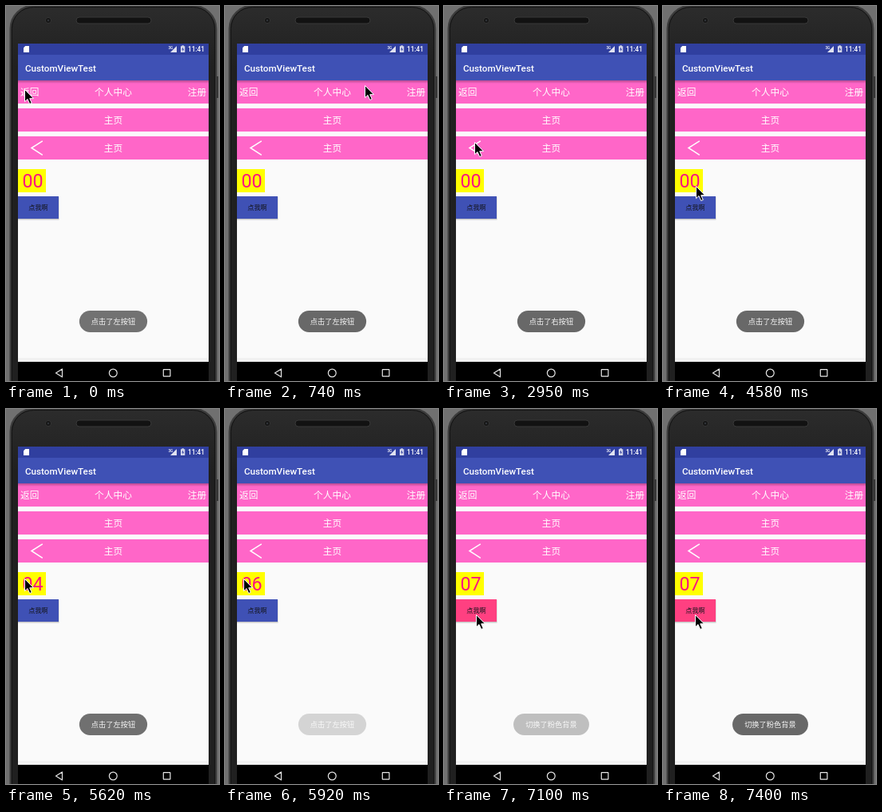
Animation of 267 by 469 pixels, one loop 8 s. Source, as an HTML page:

```html
<!DOCTYPE html>
<html lang="zh">
<head>
<meta charset="utf-8">
<title>CustomViewTest</title>
<style>
  html, body { margin: 0; width: 100%; height: 100%; overflow: hidden; background: #707070; }
  svg { display: block; width: 267px; height: 469px; }
  text { font-family: Roboto, "Noto Sans CJK SC", "Noto Sans CJK", sans-serif; }
  .bar { font-size: 11.7px; fill: #fff; }
  .mid { text-anchor: middle; }
  .medium { font-weight: 500; }
</style>
</head>
<body>
<svg viewBox="0 0 267 469">
  <defs>
    <linearGradient id="shade" x2="0" y2="1">
      <stop offset="0" stop-opacity=".28"/>
      <stop offset="1" stop-opacity="0"/>
    </linearGradient>
    <linearGradient id="body" x2="0" y2="1">
      <stop offset="0" stop-color="#2c2c2c"/>
      <stop offset=".15" stop-color="#202020"/>
    </linearGradient>
  </defs>

  <!-- phone -->
  <rect width="267" height="469" fill="#707070"/>
  <rect x="263" y="88" width="3" height="27" fill="#303030"/>
  <rect x="5.5" y="-.5" width="258" height="520" rx="29" fill="url(#body)" stroke="#3d3d3d" stroke-width="2"/>
  <rect x="7.5" y="1.5" width="254" height="520" rx="27" fill="none" stroke="#141414"/>
  <rect x="88" y="14" width="94" height="8" rx="4" fill="#121212" stroke="#393939"/>
  <circle cx="53" cy="18" r="3.6" fill="#151515" stroke="#353535"/>
  <circle cx="53" cy="18" r="1.3" fill="#2f3338"/>

  <!-- screen -->
  <rect x="15" y="47" width="239" height="422" fill="#fafafa"/>
  <rect x="15" y="47" width="239" height="14" fill="#303f9f"/>
  <rect x="15" y="61" width="239" height="32" fill="#3f51b5"/>
  <rect x="15" y="440" width="239" height="5" fill="#f2f2f2"/>
  <rect x="15" y="445" width="239" height="24"/>

  <g fill="#fff">
    <path d="M24.2 50H29V58H22V52.2Z"/>
    <path d="M214 50V58H206Z" opacity=".85"/>
    <text x="203.5" y="53.5" font-size="4.6" class="medium">3G</text>
    <path d="M220.5 50.2V49.2H222.8V50.2H224.3V58H219V50.2Z" opacity=".8"/>
    <text x="228" y="57" font-size="8.2" class="medium">11:41</text>
    <text x="24" y="81.5" font-size="11.66" class="medium">CustomViewTest</text>
  </g>
  <path d="M221.9 51.4L220.2 54.4H221.5V56.8L223.2 53.7H221.9Z" fill="#303f9f"/>

  <!-- title bars -->
  <path d="M15 93H254V122H15ZM15 128H254V157H15ZM15 163H254V192H15Z" fill="#ff66c8"/>
  <rect x="15" y="93" width="239" height="4" fill="url(#shade)"/>
  <g class="bar">
    <text x="18" y="112.3">返回</text>
    <text x="134.5" y="112.3" class="mid">个人中心</text>
    <text x="251.2" y="112.3" text-anchor="end">注册</text>
    <text x="134.5" y="147.2" class="mid">主页</text>
    <text x="134.5" y="182" class="mid">主页</text>
  </g>
  <path d="M45.8 168.8L32 177.5L45.8 186.3" fill="none" stroke="#fff" stroke-width="1.5"/>

  <!-- counter and button -->
  <rect x="15" y="204" width="35" height="29" fill="#ff0"/>
  <text id="count" x="33.6" y="226.8" class="mid" font-size="23.3" fill="#fb1280"></text>
  <rect x="15" y="239" width="51.5" height="28.5" fill="#000" opacity=".2"/>
  <rect id="button" x="15" y="238" width="51" height="28"/>
  <text x="40.5" y="255.2" class="mid medium" font-size="8.2" fill="#15161c">点我啊</text>

  <!-- navigation -->
  <g fill="none" stroke="#e6e6e6" stroke-width="1.2">
    <path d="M70.5 454V464L62.5 459Z" stroke-linejoin="round"/>
    <circle cx="134.3" cy="459" r="4.9"/>
    <rect x="197.3" y="454.6" width="8.6" height="8.6" rx=".5"/>
  </g>

  <g id="toast">
    <rect id="pill" y="381" height="27" rx="13.5" fill="#686868"/>
    <text id="note" x="134.5" y="398" class="mid" font-size="9.25" fill="#f4f4f4"></text>
  </g>

  <path id="cursor" d="M0 0V15.2L3.5 12L6.2 18L8.8 16.9L6.2 11.2H11Z" stroke="#fff" stroke-width="1" stroke-linejoin="round"/>
</svg>
<script>
const LOOP = 8000, STEP = 148, LEAD = 10;

// Each row: step, then value(s)
const path = [
  [0, 23, 104], [1, 26, 103], [2, 45, 101], [3, 85, 99], [4, 130, 98], [5, 175, 99],
  [6, 212, 102], [7, 230, 107], [8, 234, 109], [12, 234, 109],
  [13, 228, 111], [14, 190, 122], [16, 75, 156], [17, 40, 168], [18, 29, 171],
  [19, 37, 171], [20, 38, 170], [24, 38, 170],
  [27, 36, 190], [29, 40, 212], [30, 41, 225], [31, 41, 225], [32, 25, 213],
  [33, 23, 212], [41, 23, 212], [43, 25, 229], [44, 26, 239], [45, 27, 241],
  [47, 38, 255], [48, 40, 257]
];
const fade = [
  [0, .93], [1, 1], [37, 1], [38, .94], [39, .6], [40, .25], [41, 0],
  [47, 0], [48, .4], [49, .8], [50, 1]
];
const notes = [[0, '点击了左按钮'], [15, '点击了右按钮'], [27, '点击了左按钮'], [45, '切换了粉色背景']];
const counts = [[0, 0], [33, 1], [34, 2], [35, 3], [37, 4], [39, 5], [40, 6], [41, 7]];
const colors = [[0, '#3f51b5'], [48, '#ff4081']];

const $ = id => document.getElementById(id);
const [cursor, toast, pill, note, count, button] =
  ['cursor', 'toast', 'pill', 'note', 'count', 'button'].map($);

const held = (rows, k) => rows.filter(r => r[0] <= k).pop()[1];

function blend(rows, k) {
  const i = rows.findIndex(r => r[0] > k);
  if (i < 0) return rows[rows.length - 1].slice(1);
  const a = rows[i - 1], b = rows[i], u = (k - a[0]) / (b[0] - a[0]);
  return a.slice(1).map((v, j) => v + (b[j + 1] - v) * u);
}

function draw(t) {
  const k = Math.min(53, Math.floor((t % LOOP + LEAD) / STEP));
  const [x, y] = blend(path, k).map(Math.round);
  const message = held(notes, k), width = 27 + message.length * 9.7;
  cursor.setAttribute('transform', `translate(${x + .5} ${y + .5})`);
  toast.setAttribute('opacity', blend(fade, k)[0]);
  pill.setAttribute('x', 134.5 - width / 2);
  pill.setAttribute('width', width);
  note.textContent = message;
  count.textContent = String(held(counts, k)).padStart(2, '0');
  button.setAttribute('fill', held(colors, k));
}

const start = performance.now();
function tick() {
  draw(performance.now() - start);
  requestAnimationFrame(tick);
}
tick();
</script>
</body>
</html>
```
